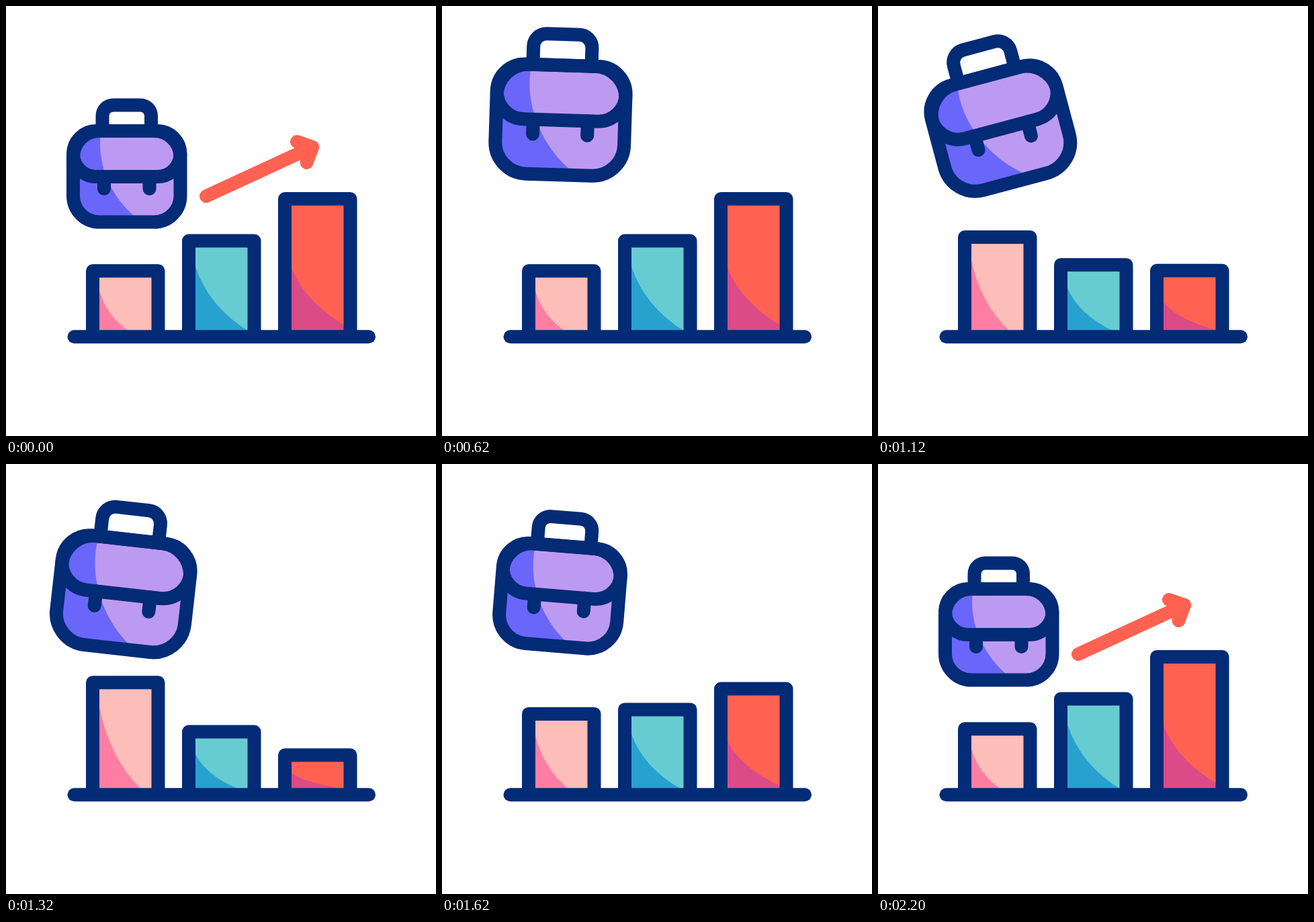
Write an HTML page that moves like this. It is 640x640 px and loops after 2400 ms.

```html
<!DOCTYPE html>
<html lang="en">
<head>
<meta charset="utf-8">
<title>Business growth</title>
<style>
  html, body { margin: 0; width: 100%; height: 100%; overflow: hidden; background: #fff; }
  svg { display: block; width: 640px; height: 640px; }
  .line { fill: none; stroke: #032b76; stroke-width: 20; stroke-linecap: round; stroke-linejoin: round; }
  .line * { vector-effect: non-scaling-stroke; }
  #arrow { stroke: #ff6251; }
</style>
</head>
<body>
<svg viewBox="0 0 640 640">
  <defs>
    <clipPath id="inside"><rect x="100" y="186" width="159.5" height="135.5" rx="39"/></clipPath>
  </defs>
  <g id="bars"></g>
  <path class="line" d="M101.5 492.3H540"/>
  <g class="line" id="arrow"><path id="shaft"/><path id="head"/></g>
  <g id="bag">
    <g clip-path="url(#inside)">
      <path fill="#bd9af2" d="M100 186h160v136H100z"/>
      <path fill="#6a66fa" d="M142 186C134 225 150 285 203 322H100V186z"/>
    </g>
    <g class="line">
      <path d="M143.5 186V163.5a16 16 0 0 1 16-16H200a16 16 0 0 1 16 16V186"/>
      <rect x="100" y="186" width="159.5" height="135.5" rx="39"/>
      <rect x="100" y="186" width="159.5" height="68" rx="34"/>
      <path d="M146 254v18M213.5 254v18"/>
    </g>
  </g>
</svg>
<script>
const LOOP = 2400, START = 200;
const $ = id => document.getElementById(id);
const mix = (a, b, p) => a + (b - a) * p;

// Eased 0 to 1 between two times.
function ramp(t, from, to) {
  const p = Math.min(1, Math.max(0, (t - from) / (to - from)));
  return Math.sin(p * Math.PI / 2) ** 2;
}
// Eased up, held, then eased down again.
const pulse = (t, a, b, c, d) => ramp(t, a, b) - ramp(t, c, d);

// The bag swings to alternate sides, reaching a turning point at each inner beat.
const BEATS = [0, 270, 550, 916, 1236, 1700, 2000], TILT = 15;
function swing(t) {
  const side = i => i === 0 || i === BEATS.length - 1 ? 0 : i % 2 ? -TILT : TILT;
  let angle = 0;
  for (let i = 1; i < BEATS.length; i++) {
    angle += (side(i) - side(i - 1)) * ramp(t, BEATS[i - 1], BEATS[i]);
  }
  return angle;
}

// Three dips while the bag hangs in the air.
function bob(t) {
  const first = 375, period = 443, n = (t - first) / period;
  return n > 0 && n < 3 ? 20 * (1 - Math.cos(n * 2 * Math.PI)) : 0;
}

function drawBag(t) {
  const lift = pulse(t, 0, 330, 1540, 2000);
  const size = 1 + 0.203 * pulse(t, 0, 400, 1220, 1620);
  const x = 179.7 - 2.7 * lift, y = 234.5 - 92 * lift + bob(t);
  $('bag').setAttribute('transform',
    `translate(${x} ${y}) rotate(${swing(t)}) scale(${size}) translate(-179.7 -234.5)`);
}

// Each pose: top of the outline, start of the shade on the left, its reach along the base.
const bars = [
  { x: 129, fill: '#fdbdb8', shade: '#ff7da3', rest: [394.3, 424, 183], moved: [325.3, 362, 201] },
  { x: 272, fill: '#67ccd1', shade: '#28a1cf', rest: [349.5, 388, 361], moved: [398.5, 432, 347] },
  { x: 415, fill: '#ff6251', shade: '#db4b87', rest: [287, 390, 520], moved: [433.3, 460, 506] }
];

function add(parent, attrs) {
  const el = document.createElementNS('http://www.w3.org/2000/svg', 'path');
  for (const k in attrs) el.setAttribute(k, attrs[k]);
  return parent.appendChild(el);
}
for (const b of bars) {
  b.parts = [{ fill: b.fill }, { fill: b.shade }, { class: 'line' }].map(a => add($('bars'), a));
}

function drawBars(t) {
  const p = pulse(t, 530, 1130, 1120, 1610), base = 484;
  for (const b of bars) {
    const [top, y, reach] = b.rest.map((v, i) => mix(v, b.moved[i], p));
    const left = b.x + 10;
    const frame = `M${b.x} 492V${top}h97.5V492`;
    const shade = `M${left} ${y}Q${mix(left, reach, 0.25)} ${mix(y, base, 0.62)} ${reach} ${base}H${left}z`;
    [frame + 'z', shade, frame].forEach((d, i) => b.parts[i].setAttribute('d', d));
  }
}

// The arrow leaves tail first and is later drawn again from its tail.
function drawArrow(t) {
  const from = t < 1000 ? ramp(t, 0, 325) : 0;
  const to = t < 1000 ? 1 : ramp(t, 1600, 1960);
  const arms = 1 - pulse(t, 300, 400, 1860, 1980);
  const at = p => `${mix(298, 456, p)} ${mix(283, 210, p)}`;
  $('shaft').setAttribute('d', from < to ? `M${at(from)}L${at(to)}` : '');
  $('head').setAttribute('d', arms > 0
    ? `M${456 - 23 * arms} ${210 - 8 * arms}L456 210L${456 - 8.5 * arms} ${210 + 23 * arms}` : '');
}

function draw() {
  const t = performance.now() % LOOP - START;
  drawBag(t);
  drawBars(t);
  drawArrow(t);
  requestAnimationFrame(draw);
}
draw();
</script>
</body>
</html>
```
